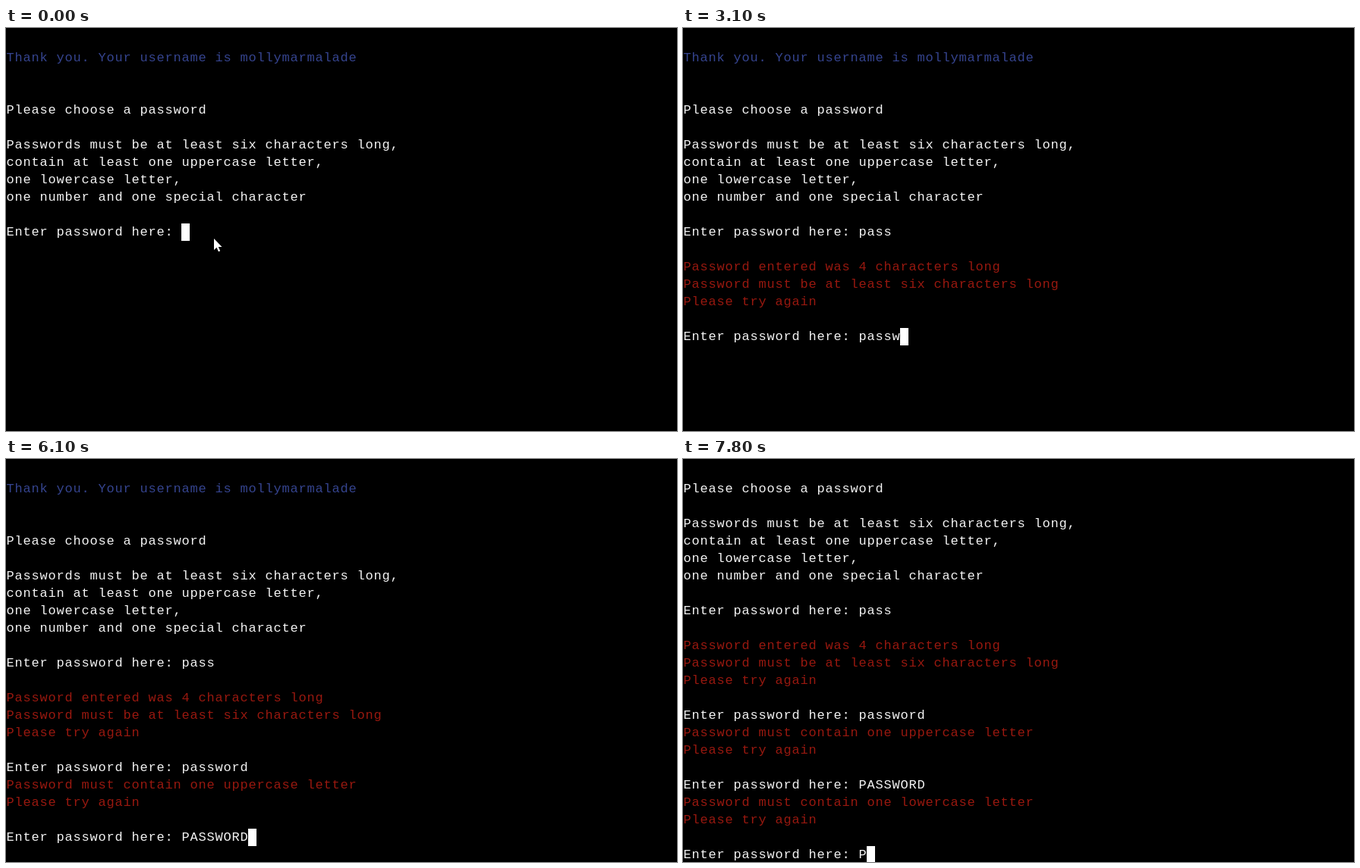
Recreate the animation shown at these times as an HTML page. Size 884 by 532 pixels, loop 8000 ms.

```html
<!DOCTYPE html>
<html lang="en">
<head>
<meta charset="utf-8">
<title>Password prompt</title>
<style>
  html, body { margin: 0; width: 100%; height: 100%; overflow: hidden; background: #000; }
  #screen {
    position: relative; width: 884px; height: 532px; overflow: hidden;
    background: #000; color: #f4f4f4;
    font: 17px/23px "Courier New", "Liberation Mono", monospace;
    letter-spacing: calc(11px - 0.6001em); /* one 11px cell per character */
  }
  .row { position: absolute; left: 0.4px; height: 23px; white-space: pre; }
  .info { color: #35448f; }
  .error { color: #98180f; }
  #cursor { position: absolute; width: 11px; height: 23px; background: #fff; }
  #pointer { position: absolute; left: 273px; top: 277px; }
</style>
</head>
<body>
<div id="screen">
  <div id="cursor"></div>
  <svg id="pointer" width="13" height="20" viewBox="0 0 13 20">
    <path d="M1 1V16L4.5 12.8L7 18.3L9.2 17.3L6.8 12H11.5Z" fill="#fff"/>
  </svg>
</div>
<script>
const LOOP = 8000, ROWS = 23, CELL_W = 11, CELL_H = 23, TOP = 5;
const PROMPT = "\nEnter password here: ";
const RETRY = "Please try again\n" + PROMPT;

const INTRO = `
Thank you. Your username is mollymarmalade


Please choose a password

Passwords must be at least six characters long,
contain at least one uppercase letter,
one lowercase letter,
one number and one special character
`;

// Terminal output as [time in ms, text appended]
const STEPS = [
  [0, INTRO + PROMPT],
  [100, "p"], [300, "a"], [700, "s"], [900, "s"], [1000, "\n"],
  [1300, "\nPassword entered was 4 characters long\n" +
         "Password must be at least six characters long\n" + RETRY],
  [2200, "p"], [2400, "a"], [2600, "s"], [2800, "s"],
  [3100, "w"], [3300, "o"], [3400, "r"], [3600, "d"], [3900, "\n"],
  [4100, "Password must contain one uppercase letter\n" + RETRY],
  [4900, "P"], [5000, "A"], [5200, "S"], [5400, "S"],
  [5600, "W"], [5800, "OR"], [6100, "D"], [7000, "\n"],
  [7200, "Password must contain one lowercase letter\n" + RETRY],
  [7800, "P"]
];

const screen = document.getElementById("screen");
const cursor = document.getElementById("cursor");
const pointer = document.getElementById("pointer");
const rows = Array.from({ length: ROWS }, (_, i) => {
  const row = document.createElement("div");
  row.style.top = TOP + i * CELL_H + "px";
  screen.insertBefore(row, cursor);
  return row;
});

function rowClass(line) {
  if (/^Thank/.test(line)) return "row info";
  if (/^(Password |Please try)/.test(line)) return "row error";
  return "row";
}

let shown = 0;

function render(t) {
  const count = STEPS.filter(([at]) => at <= t).length;
  if (count === shown) return;
  shown = count;
  const text = STEPS.slice(0, count).map(([, s]) => s).join("");
  const lines = text.split("\n").slice(-ROWS);
  rows.forEach((row, i) => {
    const line = lines[i] || "";
    row.textContent = line;
    row.className = rowClass(line);
  });
  const last = lines.length - 1;
  cursor.style.left = lines[last].length * CELL_W + "px";
  cursor.style.top = TOP + last * CELL_H + "px";
  pointer.style.display = t < 100 ? "block" : "none";
}

const start = performance.now();
function tick() {
  render((performance.now() - start) % LOOP);
  requestAnimationFrame(tick);
}
tick();
</script>
</body>
</html>
```
